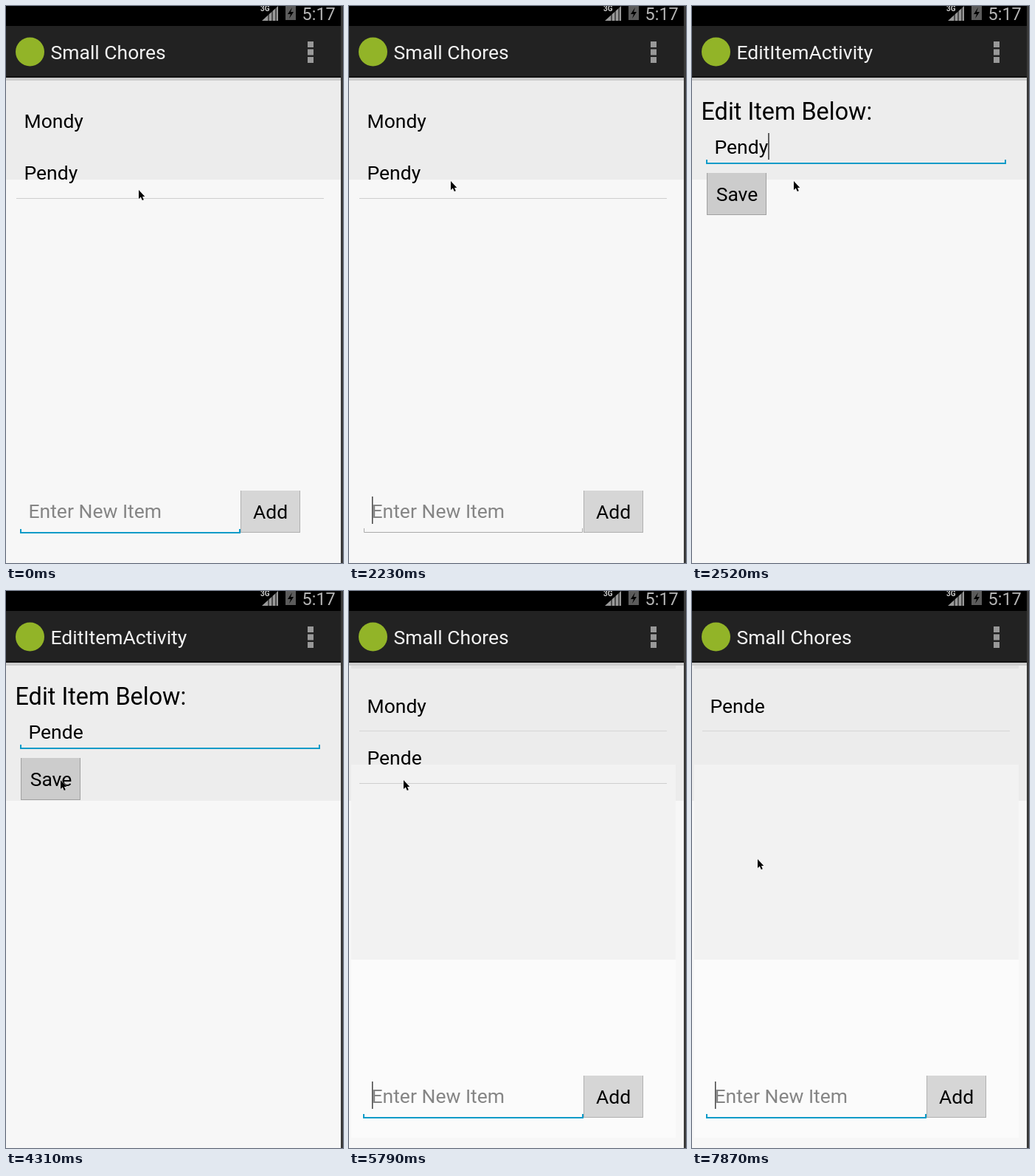
These frames come from a looping animation (457x754 px, 8000 ms). An HTML page:

```html
<!DOCTYPE html>
<html lang="en">
<head>
<meta charset="utf-8">
<title>To-do list demo</title>
<style>
  html, body { margin: 0; width: 100%; height: 100%; overflow: hidden; background: #000; }
  svg { display: block; width: 100%; height: 100%; }
  text { font: 26.5px Roboto, "Noto Sans", sans-serif; white-space: pre; }
  .title { fill: #f2f2f2; }
  .focus { fill: none; stroke: #0d9bc8; stroke-width: 2; }
  .blur { fill: none; stroke: #aaa; stroke-width: 1; }
  .mid { text-anchor: middle; }
</style>
</head>
<body>
<svg viewBox="0 0 457 754">
  <defs>
    <g id="bar">
      <rect x="-12" y="97" width="466" height="4" fill="#cdcdcd"/>
      <rect x="-12" y="27" width="466" height="70" fill="#222"/>
      <rect x="-12" y="95" width="466" height="2" fill="#111"/>
      <circle cx="32.5" cy="62" r="19.5" fill="#92b428"/>
      <path d="M409 48h8v8h-8zm0 10.5h8v8h-8zm0 10.5h8v8h-8z" fill="#999"/>
    </g>
  </defs>
  <rect width="457" height="754" fill="#000"/>

  <g id="list">
    <rect x="-12" y="27" width="466" height="737" fill="#f7f7f7"/>
    <rect id="listTop" x="-12" y="97" width="466" fill="#ececec"/>
    <g id="bands">
      <rect x="3" y="235" width="440" height="264" fill="#f2f2f2"/>
      <rect x="3" y="499" width="440" height="241" fill="#fbfbfb"/>
      <rect x="3" y="101" width="440" height="4" fill="#e2e2e2"/>
    </g>
    <use href="#bar"/>
    <text class="title" x="60.5" y="72">Small Chores</text>
    <rect id="press" x="14" y="120" width="417" height="70" fill="#33b5e5"/>
    <text id="row1" x="24.5" y="165"></text>
    <text id="row2" x="24.5" y="235"></text>
    <rect id="line1" x="14" y="189" width="417" height="1" fill="#d6d6d6"/>
    <rect id="line2" x="14" y="260" width="417" height="1" fill="#cecece"/>
    <text x="30.5" y="693" fill="#858585">Enter New Item</text>
    <path id="field"/>
    <rect id="listCaret" x="31" y="664" width="1.5" height="37" fill="#444"/>
    <rect x="318" y="656" width="81" height="57" fill="#d6d6d6"/>
    <path d="M318 712.5h81M318.5 656v57M398.5 656v57" stroke="#b0b0b0"/>
    <text class="mid" x="358.5" y="694">Add</text>
  </g>

  <g id="edit">
    <rect x="-12" y="27" width="466" height="737" fill="#f7f7f7"/>
    <rect id="editTop" x="-12" y="97" width="466" fill="#ededed"/>
    <use href="#bar"/>
    <text class="title" x="60.5" y="72">EditItemActivity</text>
    <text x="12.5" y="154" style="font-size:32.4px">Edit Item Below:</text>
    <text id="value" x="30.5" y="200"></text>
    <path class="focus" d="M20 208v5h405v-5"/>
    <rect id="editCaret" y="172" width="1.5" height="36" fill="#333"/>
    <rect id="save" x="20" y="226" width="81" height="57"/>
    <path d="M20 282.5h81M20.5 226v57M100.5 226v57" stroke="#a0a0a0"/>
    <text class="mid" x="61" y="264">Save</text>
  </g>

  <rect width="457" height="27" fill="#000"/>
  <path d="M347 20L369 0V20Z" fill="#999"/>
  <path d="M356 0v20M361 0v20M366 0v20" stroke="#000"/>
  <text x="345" y="7" fill="#ccc" style="font-size:10px;font-weight:700">3G</text>
  <path d="M379 0h14v19h-14z" fill="#5c5c5c"/>
  <path d="M388 2l-6 9h4l-2 6 6-9h-4z" fill="#000"/>
  <text x="401.5" y="19" fill="#b4b4b4" style="font-size:23.5px">5:17</text>
  <rect x="454" width="3" height="754" fill="#3a3a3a"/>
  <path id="cursor" d="M0 0V12L2.8 9.6 4.8 14 6.8 13.2 5 9H8.3Z" stroke="#fff" stroke-width=".7" paint-order="stroke"/>
</svg>
<script>
const LOOP = 8000, STEP = 148;
const el = id => document.getElementById(id);
const set = (id, attrs) => { for (const k in attrs) el(id).setAttribute(k, attrs[k]); };
const show = (id, on) => set(id, { visibility: on ? "inherit" : "hidden" });
const clamp = x => Math.max(0, Math.min(1, x));
const ease = x => x * x * (3 - 2 * x);
const blink = n => Math.floor(n / 3) % 2 === 0;

// pointer moves: first step, last step, end point
const moves = [
  [0, 2, 149, 411], [6, 12, 138, 237], [26, 29, 74, 256], [40, 42, 89, 152], [52, 53, 89, 363]
];
const pointer = n => moves.reduce(([x, y], [from, to, endX, endY]) => {
  const k = ease(clamp((n - from) / (to - from)));
  return [x + (endX - x) * k, y + (endY - y) * k];
}, [180, 249]);

function draw(t) {
  const n = Math.floor(t / STEP);

  // the edit page zooms in over a dimmed list, later fades out again
  const opening = clamp((n - 15) / 2), closing = clamp((33 - n) / 2);
  const zoom = .92 + .08 * Math.min(opening, closing);
  const back = closing < 1;
  set("list", { opacity: back ? 1 : 1 - .8 * opening });
  set("edit", {
    opacity: back ? closing : 1 - (1 - opening) ** 3,
    transform: `translate(226 358) scale(${zoom}) translate(-226 -358)`
  });

  const removed = n >= 48, focused = n < 15 || back;
  el("row1").textContent = removed ? "Pende" : "Mondy";
  el("row2").textContent = removed ? "" : back ? "Pende" : "Pendy";
  set("listTop", { height: back ? 187 : 138 });
  show("bands", back);
  show("line1", back);
  show("line2", !removed);
  set("press", { opacity: n >= 46 && !removed ? .35 + .2 * (n - 46) : 0 });
  set("field", {
    class: focused ? "focus" : "blur",
    d: focused ? "M20 708v5h297v-5" : "M20.5 707v5.5h296v-5.5"
  });
  show("listCaret", !blink(n));

  el("value").textContent = n < 23 ? "Pendy" : n < 26 ? "Pend" : "Pende";
  set("editTop", { height: opening < 1 ? 450 : n < 18 ? 138 : 187 });
  set("editCaret", { x: 30.5 + el("value").getComputedTextLength() });
  show("editCaret", blink(n - (n < 26 ? 16 : 26)));
  set("save", { fill: n === 31 ? "#b8b8b8" : "#ccc" });

  set("cursor", { transform: `translate(${pointer(n)})` });
}

let start;
function tick(now) {
  start ??= now;
  draw((now - start) % LOOP);
  requestAnimationFrame(tick);
}
draw(0);
requestAnimationFrame(tick);
</script>
</body>
</html>
```
